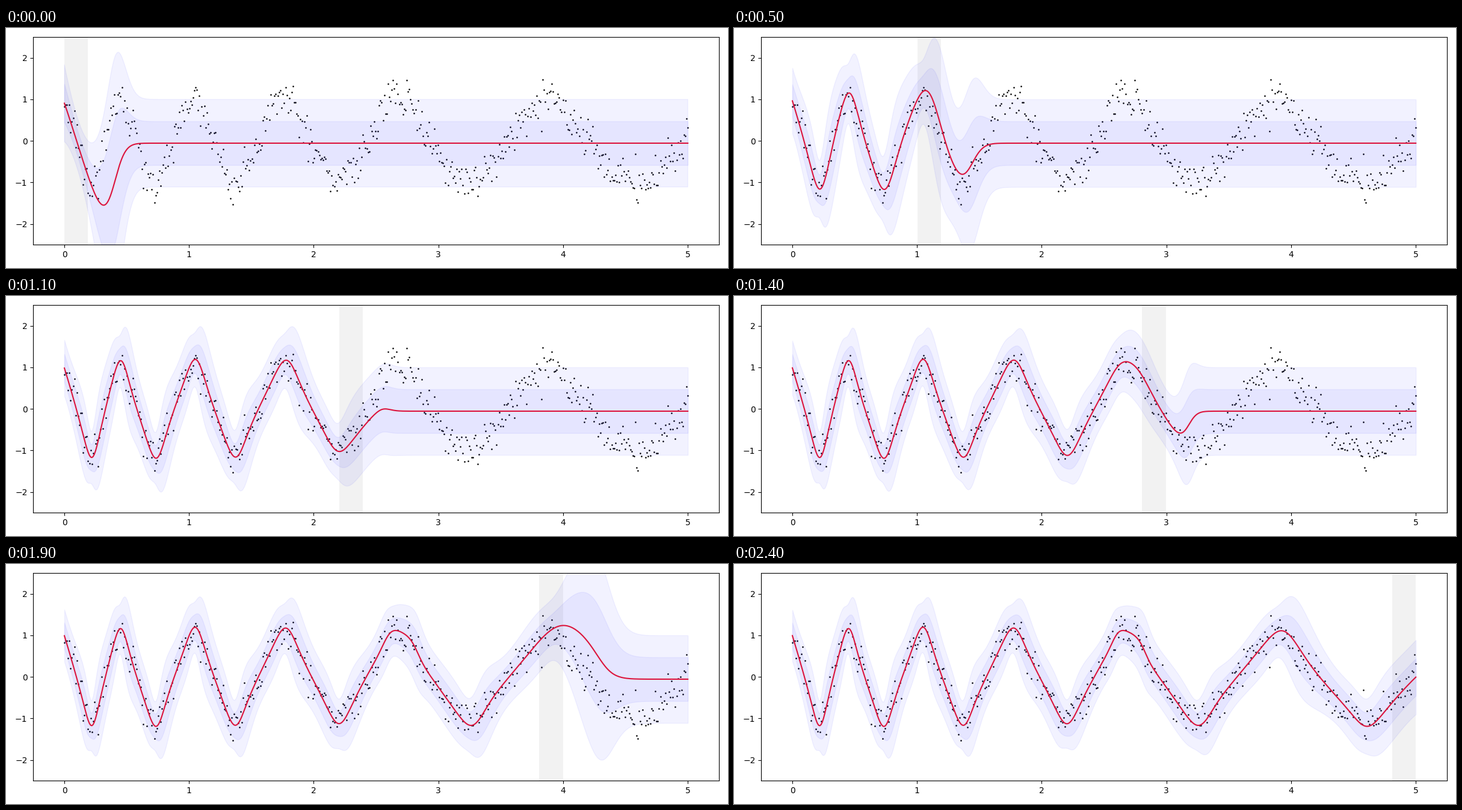
Recreate the animation shown at these times as a matplotlib script. Size 1200 by 400 pixels, loop 2500 ms.

```python
import numpy as np
import matplotlib.pyplot as plt
from matplotlib.animation import FuncAnimation

COUNT, BATCH = 500, 20
STEPS = COUNT // BATCH
NOISE_VAR = 0.075
BASE_MEAN, BASE_VAR, BASE_WEIGHT = -0.055, 0.278, 14.0
BREAKS = [0, 0.21, 0.44, 0.725, 1.04, 1.36, 1.755, 2.18,
          2.60, 2.78, 3.23, 3.90, 4.57, 5.20]

# Noisy hyperbolic chirp
np.random.seed(1337)
x = np.linspace(0, 5, COUNT)
phase = 2 * np.pi * (6.25 / 1.5) * np.log(1 + 0.6 * x)
y = np.cos(phase) + 0.25 * np.random.randn(COUNT)


def fit_expert(lo, hi, step):
    """Gate weight, mean and variance over x of one local line."""
    seen = (step + 1) * BATCH
    xs, ys = x[:seen], y[:seen]
    inside = (xs >= lo) & (xs <= hi + 0.1 * (hi - lo))
    xs, ys = xs[inside], ys[inside]
    n = len(xs)
    if n < 7:
        return None
    first = np.searchsorted(x, lo)
    mass = n * (1 + 0.6 * (step - first // BATCH))
    center, spread = xs.mean(), xs.var()
    slope = np.sum((xs - center) * ys) / (n * spread + 0.002)
    d = x - center
    width = np.sqrt(spread + 0.22 / mass)
    gate = mass / width * np.exp(-0.5 * (d / width) ** 2)
    mean = ys.mean() + slope * d
    var = NOISE_VAR * (1 + 1 / mass + d ** 2 / (mass * spread + 0.002))
    return gate, mean, var


def predict(step):
    """Moments of the mixture of local lines and the base level."""
    flat = np.ones(COUNT)
    parts = [(BASE_WEIGHT * flat, BASE_MEAN * flat, BASE_VAR * flat)]
    for lo, hi in zip(BREAKS, BREAKS[1:]):
        part = fit_expert(lo, hi, step)
        if part:
            parts.append(part)
    gate, mean, var = (np.array(p) for p in zip(*parts))
    gate = gate / gate.sum(axis=0)
    mu = (gate * mean).sum(axis=0)
    total = (gate * (var + mean ** 2)).sum(axis=0) - mu ** 2
    return mu, np.sqrt(total)


fig, ax = plt.subplots(figsize=(12, 4), dpi=100)
ax.set_xlim(-0.25, 5.25)
ax.set_ylim(-2.5, 2.5)
fig.tight_layout()
ax.scatter(x, y, s=0.75, color="black")
curve, = ax.plot([], [], color="crimson")
patches = []


def update(step):
    while patches:
        patches.pop().remove()
    mu, sd = predict(step)
    curve.set_data(x, mu)
    start = step * BATCH
    patches.append(ax.axvspan(x[start], x[start + BATCH - 1],
                              facecolor="grey", alpha=0.1))
    for c in (1, 2):
        patches.append(ax.fill_between(x, mu - c * sd, mu + c * sd,
                                       facecolor=(0, 0, 1, 0.05),
                                       edgecolor=(0, 0, 1, 0.05)))
    return [curve, *patches]


anim = FuncAnimation(fig, update, frames=STEPS, interval=100,
                     init_func=lambda: update(0), repeat=True,
                     repeat_delay=0, blit=False)
plt.show()
```
